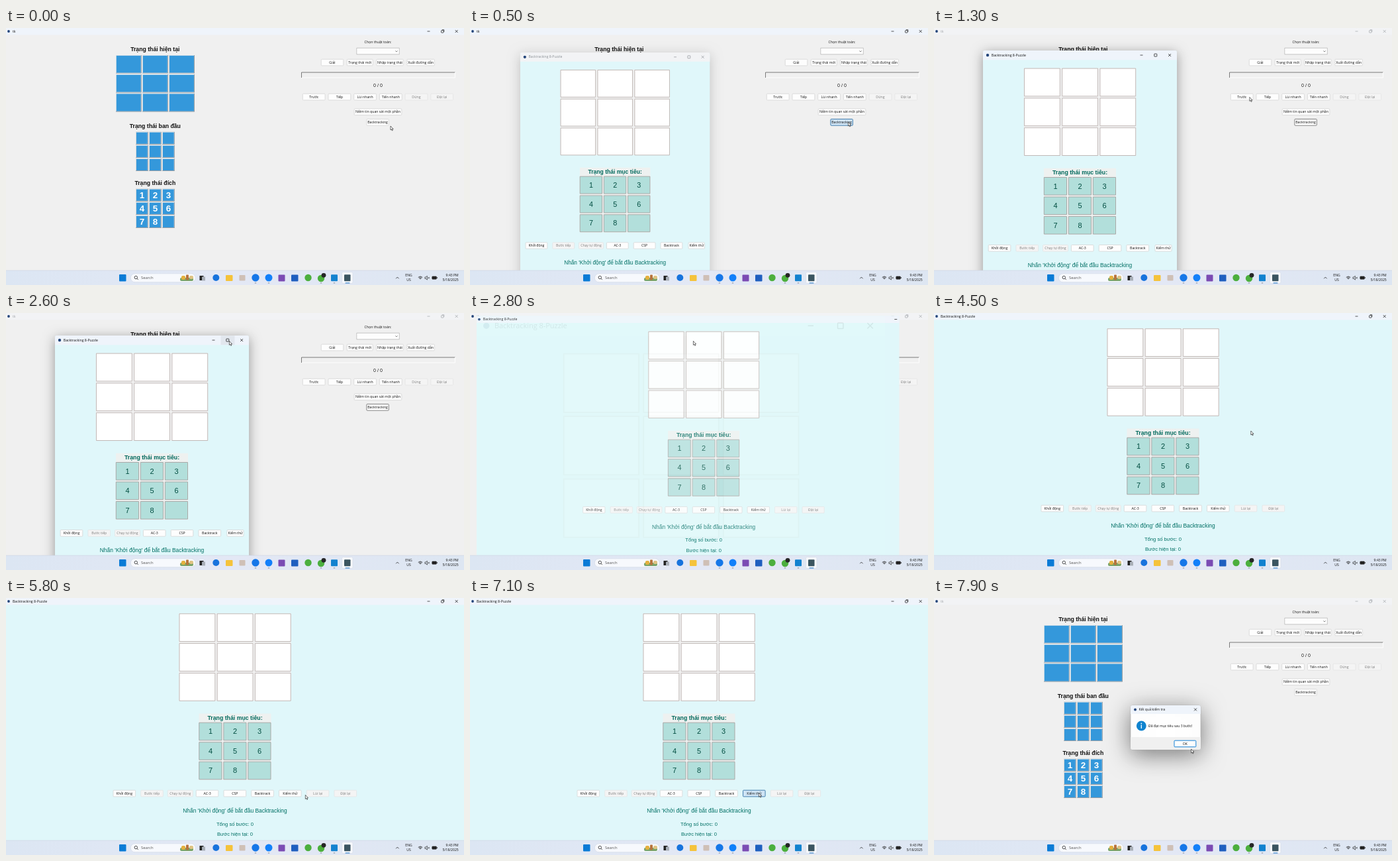
An HTML page with a canvas for the animation above (8000 ms loop, 692 px wide and 388 px high).

```html
<!DOCTYPE html>
<html lang="vi">
<head>
<meta charset="utf-8">
<title>8-Puzzle</title>
<style>
html, body { margin: 0; width: 100%; height: 100%; overflow: hidden; background: #f0f0f0 }
canvas { display: block }
</style>
</head>
<body>
<canvas id="stage" width="692" height="388"></canvas>
<script>
const g = document.getElementById('stage').getContext('2d');
const W = 692, H = 388, LOOP = 8000, BAR = 366;
const UI = '"Open Sans", "Noto Sans", sans-serif';
const ARIAL = '"Liberation Sans", Arial, sans-serif';
const TEAL = '#e0f7fa', TITLE = '#eff4fb', IDLE_TITLE = '#f2f3f5';

const clamp = v => Math.max(0, Math.min(1, v));
const mix = (a, b, p) => a + (b - a) * p;
const smooth = p => p * p * (3 - 2 * p);
const easeOut = (p, n) => 1 - (1 - p) ** n;

function box(x, y, w, h, fill, stroke, r = 0, line = .6) {
  g.beginPath();
  g.roundRect(x, y, w, h, r);
  if (fill) { g.fillStyle = fill; g.fill(); }
  if (stroke) { g.strokeStyle = stroke; g.lineWidth = line; g.stroke(); }
}

function disc(x, y, r, fill) {
  g.beginPath();
  g.arc(x, y, r, 0, 7);
  g.fillStyle = fill;
  g.fill();
}

function lines(color, width, ...paths) {
  g.strokeStyle = color;
  g.lineWidth = width;
  g.beginPath();
  for (const [x, y, ...rest] of paths) {
    g.moveTo(x, y);
    for (let i = 0; i < rest.length; i += 2) g.lineTo(rest[i], rest[i + 1]);
  }
  g.stroke();
}

function text(s, x, y, size = 5.2, color = '#111', align = 'center', font = UI, weight = '') {
  g.font = `${weight} ${size}px ${font}`;
  g.textAlign = align;
  g.textBaseline = 'middle';
  g.fillStyle = color;
  g.fillText(s, x, y + (font === ARIAL ? .6 : .3));
}

function button(label, cx, y, w, state = '') {
  const [fill, edge, ink] = {
    '': ['#fdfdfd', '#d2d2d2', '#111'],
    off: ['#f4f4f4', '#e2e2e2', '#7d7d7d'],
    hot: ['#cfe4f5', '#3574a8', '#111'],
    focus: ['#fdfdfd', '#555', '#111']
  }[state];
  box(cx - w / 2, y + .2, w, 9.7, fill, edge, 1, state === 'hot' ? .9 : .7);
  text(label, cx, y + 5.1, 5.2, ink);
}

function grid(x, y, dx, dy, drawTile) {
  for (let i = 0; i < 9; i++) drawTile(x + i % 3 * dx, y + Math.floor(i / 3) * dy, i < 8 ? i + 1 : '');
}

function controls(x, y, gap, color, restore) {
  const m = x + gap, c = x + 2 * gap;
  lines(color, .7, [x - 2, y, x + 2, y], [c - 2, y - 2, c + 2, y + 2], [c + 2, y - 2, c - 2, y + 2]);
  if (!restore) return box(m - 2, y - 2, 4, 4, null, color, .4, .7);
  box(m - 2, y - 1.3, 3.4, 3.4, null, color, .5, .7);
  lines(color, .7, [m - .8, y - 2.3, m + 2.2, y - 2.3, m + 2.2, y + .9]);
}

function titleBar(title, active = true) {
  const ink = active ? '#111' : '#a0a4a8';
  box(0, 0, W, 10.5, active ? TITLE : IDLE_TITLE);
  disc(4, 5, 1.9, '#24457a');
  text(title, 10, 5.1, 5.2, ink, 'left');
  controls(638.5, 5, 21.1, ink, true);
}

function blueTile(x, y, w, h, label) {
  box(x, y, w, h, '#858d94');
  box(x, y, w - .8, h - .8, '#dfe5e9');
  box(x + .8, y + .8, w - 1.8, h - 1.8, '#3498db');
  if (label) text(label, x + w / 2, y + h / 2, 13.4, '#fff', 'center', ARIAL, 'bold');
}

function mainWindow(active, backtrackState) {
  box(0, 0, W, H, '#f0f0f0');
  titleBar('tk', active);
  const heading = (s, y) => text(s, 225.3, y, 8.7, '#111', 'center', ARIAL, 'bold');
  heading('Trạng thái hiện tại', 32);
  heading('Trạng thái ban đầu', 148);
  heading('Trạng thái đích', 233.7);
  grid(166, 41, 40.1, 28.9, (x, y) => blueTile(x, y, 38.7, 27.6));
  grid(196.2, 156.8, 20, 20.1, (x, y) => blueTile(x, y, 18.5, 19));
  grid(196.2, 242.8, 20, 20.1, (x, y, n) => blueTile(x, y, 18.5, 19, n));

  text('Chọn thuật toán:', 562, 21.7);
  box(529.8, 30.2, 64.5, 9.6, '#fdfdfd', '#a5a5a5');
  lines('#555', .7, [588.4, 34.3, 590, 36, 591.6, 34.3]);
  button('Giải', 493, 47, 33.5);
  button('Trạng thái mới', 534.7, 47, 39);
  button('Nhập trạng thái', 580, 47, 40.5);
  button('Xuất đường dẫn', 626.7, 47, 41.5);
  lines('#6c6c6c', .9, [446.5, 75, 446.5, 67, 678.5, 67]);
  lines('#fff', .9, [447, 75, 678.5, 75, 678.5, 67]);
  text('0 / 0', 562, 87.2, 6.9);
  ['Trước', 'Tiếp', 'Lùi nhanh', 'Tiến nhanh', 'Dừng', 'Đặt lại'].forEach((s, i) =>
    button(s, 465.2 + i * 38.7, 99, 33.8, i > 3 ? 'off' : ''));
  button('Niềm tin quan sát một phần', 562, 121.7, 71.5);
  button('Backtracking', 561.6, 137.3, 33.5, backtrackState);
}

// Puzzle panel: centre x, vertical offset, x of the first button.
function puzzle(cx, oy, bx, narrow, testState) {
  box(cx - 84.8, 23.2 + oy, 169.6, 132.2, '#f0f0f0');
  grid(cx - 84, 23.8 + oy, 57.2, 44.8, (x, y) => box(x, y, 53.8, 41.8, '#fff', '#b3a9a6', 0, .8));
  box(cx - 54.5, 174.5 + oy, 109, 100, '#eef1f0');
  const label = (s, y, size, color, weight) => text(s, cx, y + oy, size, color, 'center', ARIAL, weight);
  label('Trạng thái mục tiêu:', 181, 8.75, '#00695c', 'bold');
  grid(cx - 54.2, 188.2 + oy, 37, 29.5, (x, y, n) => {
    box(x, y, 34.2, 26.6, '#b2dfdb', '#a09a98', 0, .8);
    text(n, x + 17.2, y + 13.4, 11, '#004d40', 'center', ARIAL);
  });
  const names = ['Khởi động', 'Bước tiếp', 'Chạy tự động', 'AC-3', 'CSP', 'Backtrack', 'Kiểm thử', 'Lùi lại', 'Đặt lại'];
  const off = [1, 2, 7, 8];
  names.slice(0, narrow ? 7 : 9).forEach((s, i) => {
    const x = bx + i * 41.75 + (i === 2 ? 1 : 0);
    if (i === 6 && narrow) button(s, x - 3, 290 + oy, 25);
    else button(s, x, 290 + oy, i === 2 ? 38 : 33.6, off.includes(i) ? 'off' : i === 6 ? testState : '');
  });
  label("Nhấn 'Khởi động' để bắt đầu Backtracking", 321, 8.45, '#007065');
  label('Tổng số bước: 0', 341, 7.6, '#007065');
  label('Bước hiện tại: 0', 356.8, 7.6, '#007065');
}

function withShadow(blur, alpha, draw) {
  g.save();
  g.shadowColor = `rgba(0,0,0,${alpha})`;
  g.shadowBlur = blur;
  g.shadowOffsetY = blur / 5;
  draw();
  g.restore();
}

function smallWindow(active, hover, shadow) {
  const ink = active ? '#111' : '#8b9096';
  withShadow(18, shadow, () => box(74, 34, 293, 380, TEAL, null, 3));
  box(74, 34, 293, 14.2, active ? TITLE : IDLE_TITLE, null, [3, 3, 0, 0]);
  if (hover) box(324.5, 34.2, 21, 14, '#e2e7ee');
  disc(81, 41, 2.2, '#24457a');
  text('Backtracking 8-Puzzle', 86.8, 41, 5.2, ink, 'left');
  controls(313.5, 41, 21.3, ink);
  puzzle(220.5, 37.3, 99, true);
}

function maxWindow(testState) {
  box(0, 0, W, H, TEAL);
  titleBar('Backtracking 8-Puzzle');
  puzzle(346, 0, 178.8, false, testState);
}

function openSmall(t) {
  const p = easeOut(clamp((t - 370) / 250), 2), s = mix(.9, 1, p);
  const active = t > 600;
  g.save();
  g.globalAlpha = clamp((t - 370) / 110);
  g.translate(161 * (1 - s), 164 * (1 - s));
  g.scale(s, s);
  smallWindow(active, t > 1800, active ? .38 : .2);
  g.restore();
}

function maximise(t) {
  const p = easeOut(clamp((t - 2640) / 330), 3);
  const x = mix(74, 0, p), y = mix(34, 0, p), right = mix(367, W, p);
  const s = mix(.94, 1, p), ghost = mix(1, 2.28, p);
  g.save();
  g.beginPath();
  g.rect(x, y, right - x, H);
  g.clip();
  box(x, y, right - x, H, TEAL);
  g.save();
  g.globalAlpha = clamp(p * 1.16);
  g.translate(x, y);
  g.scale(s, s);
  maxWindow();
  g.restore();
  g.globalAlpha = clamp(1 - p * 1.07);
  g.translate(x, y);
  g.scale(ghost, ghost);
  g.translate(-74, -34);
  smallWindow(true, false, 0);
  g.restore();
}

function dialog(t) {
  const p = easeOut(clamp((t - 7330) / 220), 2), s = mix(.9, 1, p);
  g.save();
  g.globalAlpha = clamp((t - 7330) / 120);
  g.translate(350 * (1 - s), 195.5 * (1 - s));
  g.scale(s, s);
  withShadow(36, .5, () => box(297, 162, 106, 67, '#fff', '#aaa', 3));
  box(297, 162, 106, 13, TITLE, null, [3, 3, 0, 0]);
  box(297, 210, 106, 19, '#f0f0f0', null, [0, 0, 3, 3]);
  disc(304, 168.5, 2, '#24457a');
  text('Kết quả kiểm tra', 309.5, 168.6, 5.2, '#111', 'left');
  lines('#111', .7, [393, 166.4, 397, 170.4], [397, 166.4, 393, 170.4]);
  disc(313.3, 193, 7.4, '#0f83cf');
  disc(313.3, 189.4, .9, '#fff');
  lines('#fff', 1.3, [313.3, 191.4, 313.3, 197]);
  text('Đã đạt mục tiêu sau 3 bước!', 324, 193.1, 5.1, '#111', 'left');
  box(363, 215.2, 32.8, 9.6, '#fdfdfd', '#0078d4', 1, .9);
  text('OK', 379.3, 220);
  g.restore();
}

function taskbar() {
  const sky = g.createLinearGradient(0, 0, W, 0);
  sky.addColorStop(0, '#dce6f3');
  sky.addColorStop(.5, '#e3e8f5');
  sky.addColorStop(1, '#dde6f2');
  box(0, BAR, W, H - BAR, sky);
  lines('#c9d2de', .6, [0, BAR, W, BAR]);
  box(171, 372, 10.5, 10.5, '#0a7bd6', null, 1);
  box(188.3, 370.8, 98, 13, '#f7f9fd', '#cfd6e2', 6.5);
  g.beginPath();
  g.arc(196.3, 376.6, 2.2, 0, 7);
  g.strokeStyle = '#222';
  g.lineWidth = .8;
  g.stroke();
  lines('#222', .8, [197.9, 378.2, 199.8, 380.1]);
  text('Search', 204, 377.2, 5.9, '#555', 'left');
  box(263, 377, 20, 5, '#78a36a', null, 2);
  box(265, 374, 6, 6, '#e4b13f', null, 2);
  box(272, 372.5, 4, 8, '#b7743d', null, 1);
  box(277, 374, 6, 5, '#dfc384', null, 2);

  box(292.5, 374, 6, 7, '#222');
  box(296, 375.5, 5, 6, '#a9afb8');
  box(332, 373, 10.5, 9, '#f5c33b', null, 1);
  box(352.5, 373, 9, 8.5, '#cfc0b6', null, 1);
  box(411.5, 372.5, 10, 10, '#7b4bb3', null, 1);
  box(431, 372.5, 10.5, 10, '#1f5fbf', null, 1);
  box(491, 372.3, 10, 10, '#1382cf', null, 1);
  box(507.5, 368.5, 16.5, 17, '#f6f8fc', '#d3dae6', 2);
  box(511, 372.3, 9.5, 10, '#3b5560', null, 1);
  disc(317.3, 377, 5, '#1773dd');
  disc(377, 377, 5.7, '#1677e8');
  disc(397, 377, 5.5, '#1280fa');
  disc(456.5, 377, 5.2, '#4caf3e');
  disc(476, 378, 5.2, '#4caf3e');
  disc(480, 373.3, 3.4, '#262626');
  for (const x of [377, 397, 476, 496]) box(x - 1.3, 384.6, 2.6, 1, '#858b94', null, .5);
  box(512.5, 384.4, 7, 1.2, '#1670c4', null, .6);

  lines('#222', .8, [589.2, 378.3, 591.4, 376.1, 593.6, 378.3]);
  text('ENG', 608.5, 373.6, 5.1);
  text('US', 608.5, 380.8, 5.1);
  g.strokeStyle = '#222';
  g.lineWidth = .8;
  for (const r of [1.6, 3.2, 4.8]) {
    g.beginPath();
    g.arc(626, 380, r, -2.3, -.84);
    g.stroke();
  }
  lines('#222', .7, [633, 376, 634.5, 376, 636.3, 374.4, 636.3, 380.2, 634.5, 378.5, 633, 378.5, 633, 376],
    [637.7, 376.2, 639.7, 378.4], [639.7, 376.2, 637.7, 378.4]);
  box(643.8, 375, 6.6, 4.2, '#222', '#222', .8);
  box(651, 376.2, .8, 1.8, '#222');
  text('9:43 PM', 683.7, 373.6, 5.1, '#111', 'right');
  text('5/18/2025', 683.7, 380.8, 5.1, '#111', 'right');
}

// Pointer stops: time, x, y.
const route = [
  [0, 581, 148], [100, 581, 148], [350, 571.4, 142], [950, 571.4, 142],
  [1750, 340, 50], [2000, 337.4, 42.4], [2900, 337.4, 42.4], [3450, 372, 112],
  [4000, 450, 165], [4500, 478.8, 178], [4850, 478.8, 178], [5350, 520, 270],
  [5900, 446, 300], [6300, 436.4, 294.2], [7450, 436.4, 294.2], [7850, 388.6, 228], [LOOP, 388.6, 228]
];
const arrow = new Path2D('M0 0V6L1.4 4.8L2.4 7L3.4 6.5L2.4 4.4H4.2Z');

function cursor(t) {
  const i = route.findIndex(k => k[0] > t);
  const a = route[i - 1], b = route[i];
  const p = smooth((t - a[0]) / (b[0] - a[0]));
  g.save();
  g.translate(mix(a[1], b[1], p), mix(a[2], b[2], p));
  g.fillStyle = '#fff';
  g.fill(arrow);
  g.strokeStyle = '#111';
  g.lineWidth = .6;
  g.stroke(arrow);
  g.restore();
}

function render(t) {
  if (t < 2970) {
    mainWindow(t < 600, t < 280 ? '' : t < 1050 ? 'hot' : 'focus');
    if (t > 2640) maximise(t);
    else if (t > 370) openSmall(t);
  } else if (t < 7250) {
    maxWindow(t > 6000 ? 'hot' : '');
  } else {
    mainWindow(false, '');
    if (t > 7330) dialog(t);
  }
  taskbar();
  cursor(t);
}

function frame() {
  render(performance.now() % LOOP);
  requestAnimationFrame(frame);
}
frame();
</script>
</body>
</html>
```
